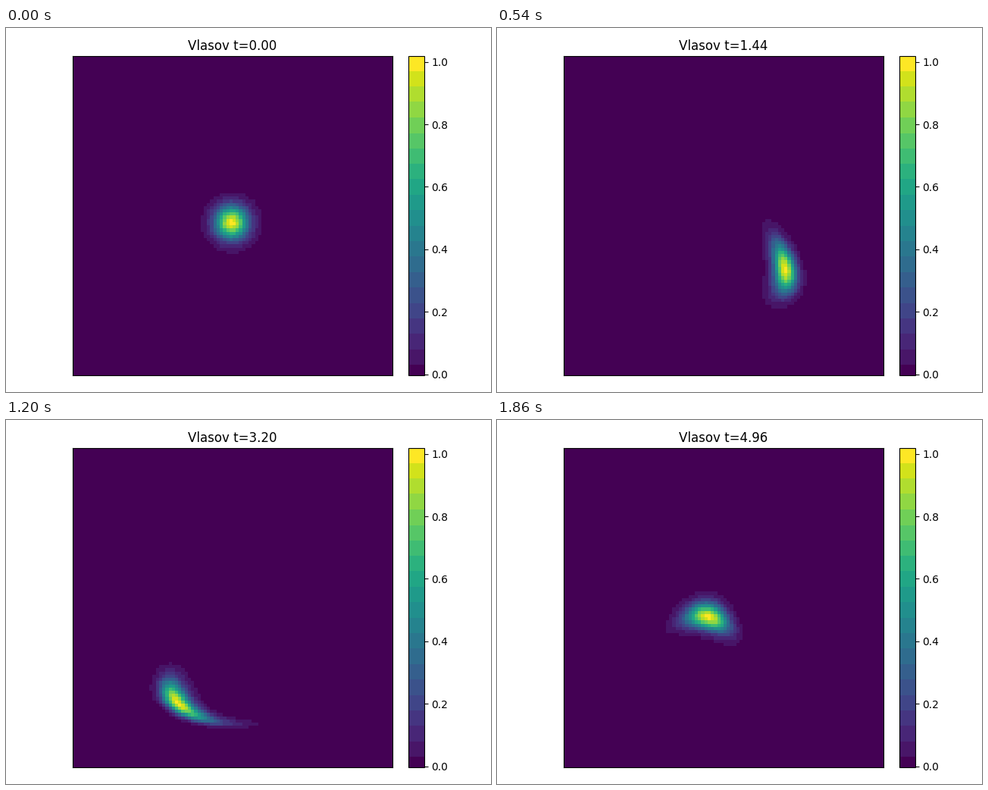
A matplotlib script that plays this animation: 640 px wide and 480 px high, repeating every 1890 ms.

```python
import numpy as np
import matplotlib.pyplot as plt
from matplotlib.animation import FuncAnimation
from matplotlib.colors import ListedColormap

W, H, DPI = 640, 480, 100
FRAMES, INTERVAL, DT = 63, 30, 0.08
CELLS, HALF = 100, 5.0
VMIN, VMAX = -0.0044, 1.0175
X0, V0, WIDTH = 0.215, -0.03, 0.51


def force(x):
    return 1.525 - 0.1 * x - 0.118 * x**3


def rk4(x, v, h):
    k1, a1 = v, force(x)
    k2, a2 = v + h / 2 * a1, force(x + h / 2 * k1)
    k3, a3 = v + h / 2 * a2, force(x + h / 2 * k2)
    k4, a4 = v + h * a3, force(x + h * k3)
    return (x + h / 6 * (k1 + 2 * k2 + 2 * k3 + k4),
            v + h / 6 * (a1 + 2 * a2 + 2 * a3 + a4))


def densities(substeps=4):
    """Trace every cell back along its characteristic to the initial Gaussian."""
    axis = (np.arange(CELLS) + 0.5) * 2 * HALF / CELLS - HALF
    x, v = np.meshgrid(axis, axis, indexing="ij")
    result = []
    for _ in range(FRAMES):
        result.append(np.exp(-((x - X0)**2 + (v - V0)**2) / WIDTH**2))
        for _ in range(substeps):
            x, v = rk4(x, v, -DT / substeps)
    return result


def banded_viridis(first=0.03, step=0.0495, n=1024):
    value = VMIN + (np.arange(n) + 0.5) / n * (VMAX - VMIN)
    band = np.floor((value - first) / step) + 1
    mid = first + step * (band - 0.5)
    level = (mid - VMIN) / (VMAX - VMIN)
    level[band == 0] = 0
    level[band == band.max()] = 1
    return ListedColormap(plt.get_cmap("viridis")(np.clip(level, 0, 1)))


def pixel_axes(left, right, top=37.4, bottom=458.4):
    return fig.add_axes([left / W, 1 - bottom / H,
                         (right - left) / W, (bottom - top) / H])


plt.rcParams["font.family"] = "DejaVu Sans"
fig = plt.figure(figsize=(W / DPI, H / DPI), dpi=DPI, facecolor="white")
ax = pixel_axes(88.45, 509.55)
cax = pixel_axes(530.6, 551.6)

field = densities()
image = ax.imshow(field[0], cmap=banded_viridis(), vmin=VMIN, vmax=VMAX,
                  aspect="auto", interpolation="nearest")
ax.set_xticks([])
ax.set_yticks([])
title = ax.set_title("Vlasov t=0.00", fontsize=12)
fig.colorbar(image, cax=cax)


def update(i):
    image.set_data(field[i])
    title.set_text(f"Vlasov t={i * DT:.2f}")
    return image, title


anim = FuncAnimation(fig, update, frames=FRAMES, interval=INTERVAL,
                     repeat=True, repeat_delay=0, blit=False)
plt.show()
```
